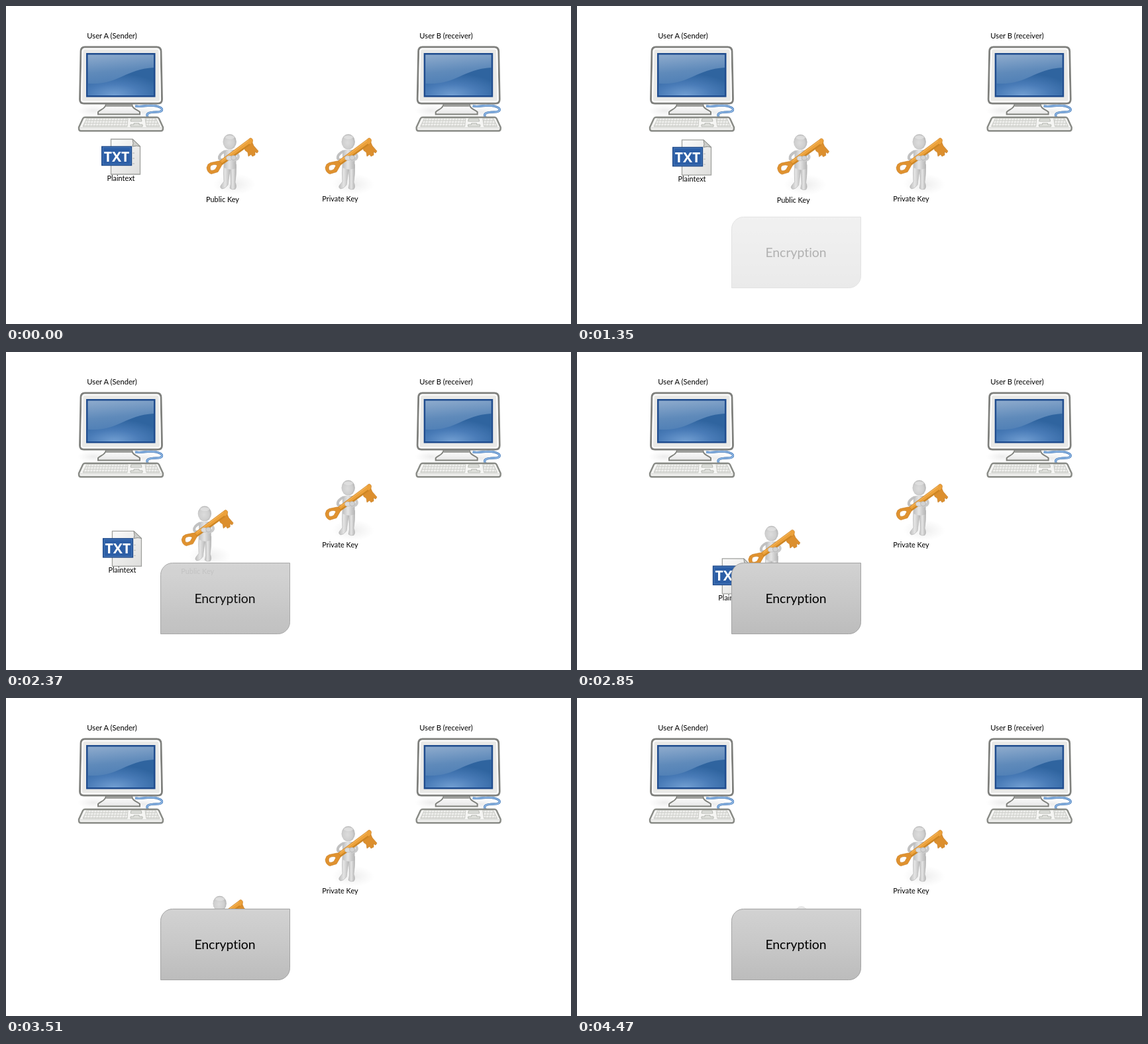
An HTML page for the animation above (4530 ms loop, 853 by 480 pixels).

```html
<!DOCTYPE html>
<html lang="en">
<head>
<meta charset="utf-8">
<title>Public key encryption</title>
<style>
  html, body { margin: 0; width: 100%; height: 100%; overflow: hidden; background: #fff; }
  svg { display: block; width: 100vw; height: 100vh; }
  text { font-family: Lato, "Open Sans", sans-serif; font-size: 10.9px; font-variant-ligatures: none; text-anchor: middle; }
  .user { font-size: 11.2px; }
</style>
</head>
<body>
<svg viewBox="0 0 853 480">
  <defs>
    <linearGradient id="case" x2="0" y2="1">
      <stop stop-color="#fff"/><stop offset="1" stop-color="#e6e6e6"/>
    </linearGradient>
    <linearGradient id="screen" x2=".15" y2="1">
      <stop stop-color="#8eabcd"/><stop offset=".45" stop-color="#5f8aba"/><stop offset="1" stop-color="#4377b3"/>
    </linearGradient>
    <radialGradient id="glow" cx=".4" cy="1" r=".8">
      <stop stop-color="#729fd2"/><stop offset=".5" stop-color="#4a7cb8"/><stop offset="1" stop-color="#2f649f"/>
    </radialGradient>
    <linearGradient id="page" x2="1" y2="1">
      <stop stop-color="#fbfbfb"/><stop offset="1" stop-color="#dededc"/>
    </linearGradient>
    <radialGradient id="skin" cx=".45" cy=".55" r=".62">
      <stop stop-color="#dcdcdc"/><stop offset=".6" stop-color="#cfcfcf"/><stop offset="1" stop-color="#adadad"/>
    </radialGradient>
    <linearGradient id="limb">
      <stop stop-color="#bebebe"/><stop offset=".45" stop-color="#e4e4e4"/><stop offset="1" stop-color="#b4b4b4"/>
    </linearGradient>
    <radialGradient id="shade">
      <stop stop-color="#888" stop-opacity=".4"/><stop offset="1" stop-color="#999" stop-opacity="0"/>
    </radialGradient>
    <linearGradient id="panel" x2="0" y2="1">
      <stop stop-color="#d2d2d2"/><stop offset=".5" stop-color="#c8c8c8"/><stop offset="1" stop-color="#bcbcbc"/>
    </linearGradient>
    <pattern id="keys" width="4.4" height="4" patternUnits="userSpaceOnUse" patternTransform="translate(120 169) skewX(-12)">
      <rect width="4.4" height="4" fill="#d3d4d0"/>
      <rect x=".6" y=".6" width="3.3" height="2.8" rx=".6" fill="#f1f1ef"/>
    </pattern>

    <g id="computer">
      <ellipse cx="132" cy="158" rx="24" ry="9" fill="url(#shade)" opacity=".4"/>
      <ellipse cx="208" cy="160" rx="26" ry="8" fill="url(#shade)" opacity=".4"/>
      <g fill="none">
        <path id="cable" d="M195 151C208 153 214 148 227 151C239 154 238 160 227 160C214 160 210 163 215 169" stroke="#5587c2" stroke-width="3"/>
        <use href="#cable" style="stroke: #a4c8ef"/>
        <path d="M195 151C208 153 214 148 227 151C239 154 238 160 227 160C214 160 210 163 215 169" stroke="#a4c8ef" stroke-width="1.100"/>
      </g>
      <path d="M151 148C150 156 142 156 139 160V163.500H202V160C198 156 191 156 190 148Z" fill="url(#case)" stroke="#80827d" stroke-width="2"/>
      <path d="M151 148H190V152H151Z" fill="#9fa09d"/>
      <path d="M119 62H227.500Q233.500 62 234 68L235.500 141Q235.500 147 229.500 147H117.500Q111.500 147 111.500 141L113 68Q113.500 62 119 62Z" fill="#e9e9e7" stroke="#7f807d" stroke-width="2.800"/>
      <path d="M119 64.500H227.500Q231 64.500 231.500 68L233 141Q233 144.500 229.500 144.500H117.500Q114 144.500 114 141L115.500 68Q116 64.500 119 64.500Z" fill="none" stroke="#fff" stroke-width="2"/>
      <rect x="121" y="71" width="104.500" height="66.500" fill="#1f4c8e"/>
      <rect x="123.500" y="73.500" width="99.500" height="61.500" fill="url(#screen)"/>
      <path d="M123.500 117C170 120 177 96 223 93V135H123.500Z" fill="url(#glow)"/>
      <path d="M119 168H228Q230 168 231 170L237 183V185Q237 188.500 234 188.500H113Q110 188.500 110 185V183L116 170Q117 168 119 168Z" fill="#f5f5f3" stroke="#888a85" stroke-width="2.400"/>
      <path d="M111 184H236" stroke="#cfd0cd"/>
      <g stroke="#bfc0bc" stroke-width=".8">
        <path d="M122 169.500H184L183 182H116Z" fill="url(#keys)"/>
        <path d="M189 170H204L205 174H188ZM193 177H201V179H206V182H188V179H193Z" fill="#dfe0dc" stroke="#a9aba5"/>
        <path d="M210 169.500H226L232 182H212Z" fill="url(#keys)"/>
      </g>
    </g>

    <g id="person">
      <ellipse cx="345" cy="269" rx="32" ry="16" fill="url(#shade)" opacity=".38"/>
      <g fill="url(#limb)" stroke="#b0b0b0" stroke-width=".6">
        <path d="M329 239H339.500L337 256L335 270Q331 276 326 276Q322 274 325 270L329 265Q328 252 329 239Z"/>
        <path d="M338 239H347.500Q348 254 346 266Q349 273 346 276.500Q341 278 338 275L339.500 268Z"/>
      </g>
      <path d="M332 217H344Q348 220 347.500 228L347.500 245Q338 249 329 244L329 227Q328 219 332 217Z" fill="url(#limb)"/>
      <ellipse cx="337.700" cy="205" rx="10.200" ry="11.500" fill="url(#skin)"/>
      <ellipse cx="338" cy="198" rx="7" ry="3" fill="#e4e4e4" opacity=".7"/>
      <path d="M330 219.500Q321 224 322 230Q324 234 334 231" fill="none" stroke="#c1c1c1" stroke-width="4" stroke-linecap="round"/>
      <path d="M345.500 220Q354 226 349 231L344 233" fill="none" stroke="#cacaca" stroke-width="4" stroke-linecap="round"/>
      <g stroke="#c57a1d" stroke-width=".6">
        <path d="M359 211L371 204L374 211L381 219L379 222L376 220V225L372 227L370 224L366 227L365 221L361 218Z" fill="#dc8f2e"/>
        <path d="M321 235L366 201.500Q370 197 372.500 202Q373 206 370 208.500L326 240Z" fill="#eca13b"/>
        <path fill-rule="evenodd" d="M305 239L309 236.500L321 234Q326 235 326 240L320 250.500L310 253.500Q304 252 303 244ZM310 240.500Q307 243 309 248Q313 249 316 246.500L319 241Q317 238 310 240.500Z" fill="#e0922f"/>
      </g>
      <path d="M326 238.500L368 208.500" stroke="#cb8422" stroke-width="1.800"/>
      <path d="M326 233L366 203" stroke="#f7bd63"/>
      <ellipse cx="337" cy="229.500" rx="4.500" ry="3.500" fill="#dcdcdc" stroke="#b0b0b0" stroke-width=".6"/>
      <ellipse cx="343.500" cy="229" rx="4" ry="3.500" fill="#d2d2d2" stroke="#aaa" stroke-width=".6"/>
    </g>
  </defs>

  <rect width="853" height="480" fill="#fff"/>
  <text class="user" x="160" y="49">User A (Sender)</text>
  <text class="user" x="664.500" y="49">User B (receiver)</text>
  <use href="#computer"/>
  <use href="#computer" x="509.700"/>
  <use href="#person" x="179"/>
  <text x="504.500" y="295">Private Key</text>

  <g id="plaintext">
    <path d="M158.500 201H191L202.500 212V254H158.500Z" fill="url(#page)" stroke="#a0a19e" stroke-width="1.300"/>
    <path d="M191 201Q193 208 191 212Q198 210 202.500 212Z" fill="#cdcecb" stroke="#8d8e8a"/>
    <path d="M191 222H194M191 230H194M191 238H194" stroke="#c3c4c1" stroke-width="1.300"/>
    <rect x="144.700" y="212.200" width="44.800" height="28.300" fill="#2c5ea6" stroke="#1f4a8b" stroke-width="1.400"/>
    <rect x="146.200" y="213.700" width="41.800" height="25.300" fill="none" stroke="#4f80bf" stroke-width=".8"/>
    <text x="167" y="234.500" fill="#fff" style="font: 700 21.200px 'Open Sans', sans-serif">TXT</text>
    <text x="173.500" y="264">Plaintext</text>
  </g>
  <g id="publicKey">
    <use href="#person"/>
    <text x="327" y="296">Public Key</text>
  </g>
  <g id="encryption" opacity="0">
    <path d="M251.500 318.500H428.500V407.500A18 18 0 0 1 410.500 425.500H233.500V336.500A18 18 0 0 1 251.500 318.500Z" fill="url(#panel)" stroke="#a3a3a3"/>
    <text x="330.500" y="379" style="font-size: 19.400px">Encryption</text>
  </g>
</svg>
<script>
  const LOOP = 4530, FIRST_STEP = 930, STEP = 60;
  const [plaintext, publicKey, encryption] =
    ["plaintext", "publicKey", "encryption"].map(id => document.getElementById(id));

  const progress = (t, start, length) => Math.min(1, Math.max(0, (t - start) / length));
  const easeInOut = u => (1 - Math.cos(Math.PI * u)) / 2;
  const move = (node, x, y) => node.setAttribute("transform", `translate(${x.toFixed(2)} ${y.toFixed(2)})`);

  function draw(time) {
    const t = time < FIRST_STEP ? 0 : FIRST_STEP + Math.floor((time - FIRST_STEP) / STEP) * STEP;
    const p = easeInOut(progress(t, 1215, 3000));

    // The key swings left on its way down; the text drops, then turns right behind the panel.
    const swing = Math.max(0, Math.sin(Math.PI * p)) ** 1.15;
    move(publicKey, p - 46 * swing, 121 * p);
    move(plaintext, Math.min(150, 570 * Math.max(0, p - 0.28) ** 1.81), 241 * p - 81.5 * p * p);

    publicKey.setAttribute("opacity", 1 - progress(t, 4200, 500));
    encryption.setAttribute("opacity", t ? progress(t, 870, 1600) : 0);
  }

  const origin = performance.now();
  function tick() {
    draw((performance.now() - origin) % LOOP);
    requestAnimationFrame(tick);
  }
  tick();
</script>
</body>
</html>
```
